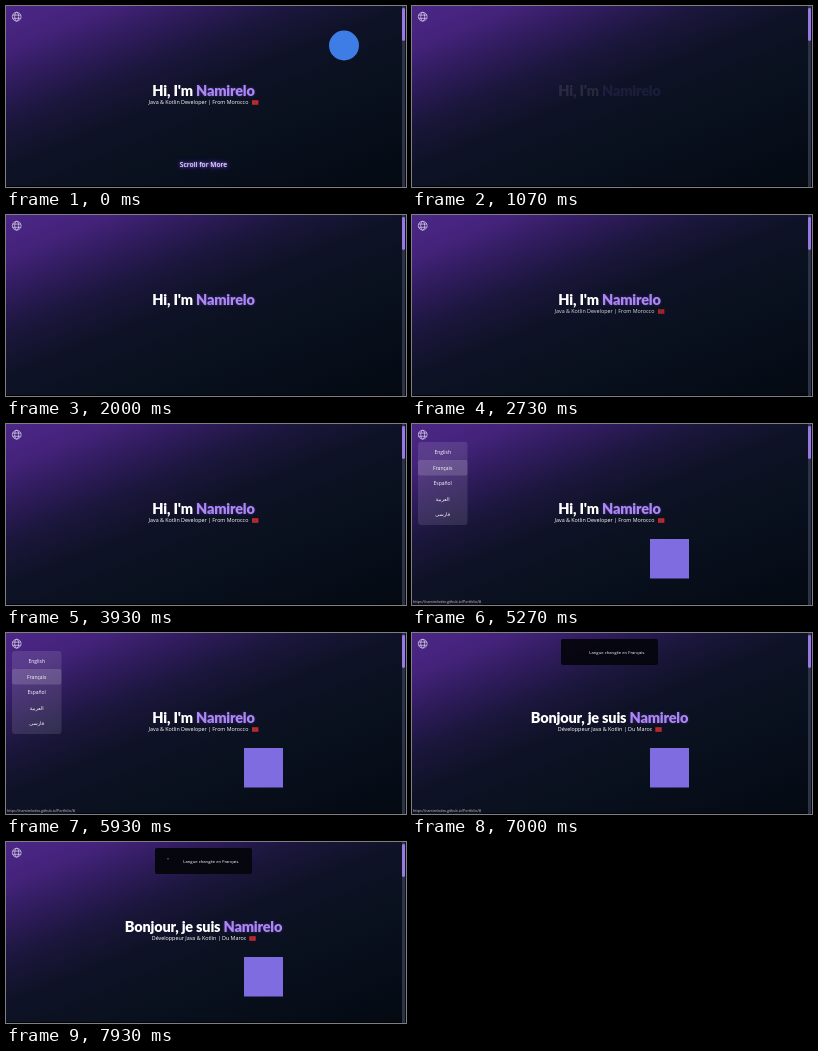
An HTML page for the animation above (8000 ms loop, 400x181 px).

```html
<!DOCTYPE html>
<html lang="en">
<head>
<meta charset="utf-8">
<title>Portfolio</title>
<style>
  html, body { margin: 0; width: 100%; height: 100%; overflow: hidden; background: #040911; }
  body {
    background: linear-gradient(158deg,
      #4c2787 0%, #44237b 12%, #2d1b59 24%, #1a163b 35%, #0f1227 47%, #0a111f 62%, #070e1a 80%, #040911 100%);
  }
  svg { position: absolute; left: 0; top: 0; width: 100%; height: 100%; }
  text { font-family: "Open Sans", "Noto Sans", "DejaVu Sans", sans-serif; font-weight: 500; fill: #fff; }
  .title { font: 900 14.5px Lato, sans-serif; letter-spacing: -.2px; text-anchor: middle; }
  .name { fill: #ac87f5; text-shadow: 0 0 3px #7c4dd866; }
  .sub { font-size: 5.35px; }
  .scroll { font-size: 6.7px; font-weight: 600; text-anchor: middle; fill: #e9e1ff; text-shadow: 0 0 3px #9a6cff, 0 0 6px #7c4dd8; }
  .item { font-size: 5px; text-anchor: middle; }
  .toast { font-size: 4.2px; }
  .url { font-size: 3.6px; fill: #c9ccd6; }
</style>
</head>
<body>
<svg viewBox="0 0 400 181">
  <defs>
    <g id="flag">
      <rect width="6.4" height="4.6" fill="#c1272d"/>
      <circle cx="3.2" cy="2.3" r=".8" fill="#2b5a35"/>
    </g>
  </defs>

  <rect y="180" width="400" height="1" fill="#020409"/>
  <rect x="396" width="3" height="181" fill="#2c3346"/>
  <rect x="396" y="2" width="3" height="33" rx="1.4" fill="#9a78e4"/>

  <g fill="none" stroke="#ded8ee" stroke-width=".7">
    <circle cx="10.7" cy="10.7" r="4.4"/>
    <ellipse cx="10.7" cy="10.7" rx="2" ry="4.4"/>
    <path d="M6.7 9.1h8M6.7 12.3h8"/>
  </g>

  <circle id="logoA" cx="338" cy="39.5" r="15" fill="#3f7de6"/>
  <rect id="logoB" x="238" y="115" width="39" height="39.5" fill="#7f6ce0"/>

  <g id="english">
    <text id="titleEn" class="title" x="197.5" y="90">Hi, I'm <tspan class="name">Namirelo</tspan></text>
    <g id="subEn">
      <text class="sub" x="142.6" y="97.8">Java &amp; Kotlin Developer | From Morocco</text>
      <use href="#flag" x="246" y="94.2"/>
    </g>
    <text id="scroll" class="scroll" x="197.5" y="160.5">Scroll for More</text>
  </g>

  <g id="french">
    <text class="title" x="197.5" y="90">Bonjour, je suis <tspan class="name">Namirelo</tspan></text>
    <text class="sub" x="145.8" y="97.8">Développeur Java &amp; Kotlin | Du Maroc</text>
    <use href="#flag" x="243.3" y="94.2"/>
  </g>

  <g id="menu">
    <rect x="6" y="18" width="49.5" height="83" rx="3" fill="#ffffff1c"/>
    <rect id="hover" x="6" y="36" width="49.5" height="15.5" rx="2" fill="#ffffff26"/>
  </g>

  <g id="toast">
    <rect x="149" y="6" width="97" height="26" rx="2" fill="#06060e"/>
    <path id="mark" d="M161 16.8h2" stroke="#8a8aa0" stroke-width=".7"/>
    <text class="toast" x="177.3" y="20.5">Langue changée en Français.</text>
  </g>

  <g id="status">
    <rect y="175.5" width="70" height="5.5" fill="#10121f"/>
    <text class="url" x="1" y="179.4">https://namirelodev.github.io/Portfolio/#</text>
  </g>
</svg>
<script>
const LOOP = 8000;
const $ = id => document.getElementById(id);

// Language list
["English", "Français", "Español", "العربية", "فارسی"].forEach((label, i) => {
  const t = document.createElementNS("http://www.w3.org/2000/svg", "text");
  t.setAttribute("class", "item");
  t.setAttribute("x", 30.7);
  t.setAttribute("y", 30 + i * 15.6);
  t.textContent = label;
  $("menu").append(t);
});

// steps: [ms, value]; the outer values hold to both ends of the loop
function play(id, prop, steps, easing = "linear") {
  const all = [[0, steps[0][1]], ...steps, [LOOP, steps[steps.length - 1][1]]];
  const frames = all.map(([ms, v]) => ({ offset: ms / LOOP, [prop]: v, easing }));
  $(id).animate(frames, { duration: LOOP, iterations: Infinity });
}
const fade = (id, ...steps) => play(id, "opacity", steps);
const move = (id, ...steps) => play(id, "transform", steps, "ease-out");

fade("logoA", [270, 1], [900, 0]);
fade("logoB", [4070, 0], [5200, 1]);

fade("scroll", [270, 1], [900, 0]);
fade("titleEn", [950, 1], [1000, 0], [1700, 1]);
fade("subEn", [950, 1], [1000, 0], [2000, 0], [2850, 1]);
fade("english", [6250, 1], [6250, 0]);
fade("french", [6250, 0], [6250, 1]);

fade("menu", [4070, 0], [4330, 1], [6050, 1], [6250, 0]);
move("menu", [4070, "translateY(-3px)"], [4330, "translateY(0)"]);
fade("hover", [4930, 0], [5050, 1]);
move("hover", [5250, "translateY(-15.6px)"], [5250, "translateY(0)"]);
fade("status", [4950, 0], [5050, 1], [7550, 1], [7700, 0]);

fade("toast", [6670, 0], [6950, .95], [7200, 1]);
move("toast", [6670, "translateY(-8px)"], [6950, "translateY(0)"]);
fade("mark", [7600, 0], [7850, 1]);
</script>
</body>
</html>
```
